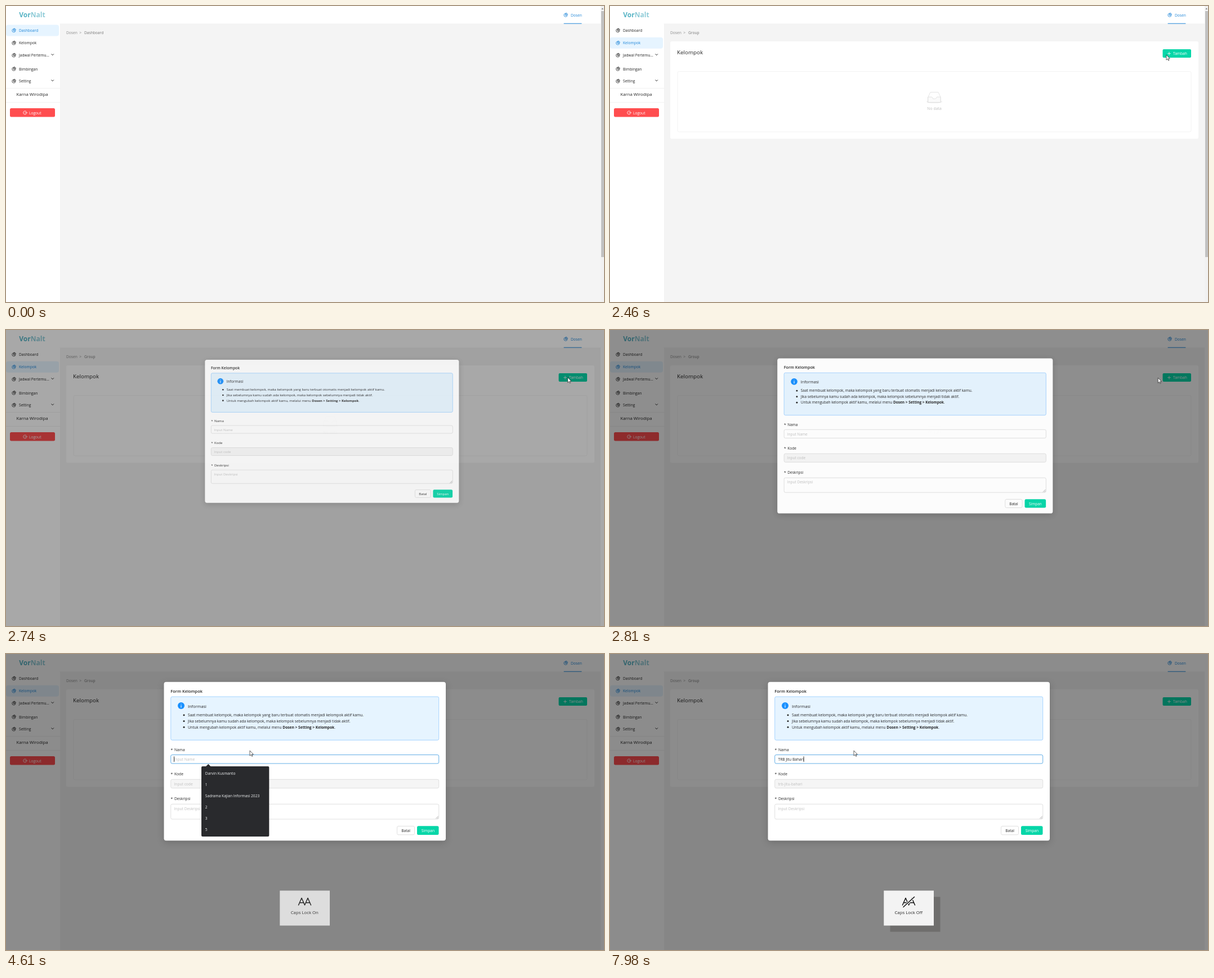
Animation, 1062 px wide and 527 px high, one loop 8 s. Source, as an HTML page:

```html
<!DOCTYPE html>
<html lang="id">
<head>
<meta charset="utf-8">
<title>Form Kelompok</title>
<style>
  html, body { margin: 0; width: 100%; height: 100%; overflow: hidden; background: #fff; }
  svg { display: block; width: 1062px; height: 527px; }
  text { font: 6.65px "Open Sans", "Noto Sans", sans-serif; fill: #262626; white-space: pre; }
  .hint { fill: #bfbfbf; }
  .mid { text-anchor: middle; }
  .line { fill: none; stroke-linecap: round; stroke-linejoin: round; }
</style>
</head>
<body>
<svg id="stage" viewBox="0 0 1062 527"></svg>
<script>
const LOOP = 8000;
const BLUE = '#1f86d8', GREEN = '#06d6a8', DARK = '#262626';

// Markup helpers
const rect = (x, y, w, h, fill, extra = '') =>
  `<rect x="${x}" y="${y}" width="${w}" height="${h}" fill="${fill}" ${extra}/>`;
const text = (x, y, str, style = '', attrs = '') =>
  `<text x="${x}" y="${y}" style="${style}" ${attrs}>${str}</text>`;
const path = (d, stroke, width = 0.8, extra = '') =>
  `<path class="line" d="${d}" stroke="${stroke}" stroke-width="${width}" ${extra}/>`;
const group = (id, body, extra = '') => `<g id="${id}" ${extra}>${body}</g>`;
const pie = (x, y) => path(
  'M-.6-2.9A3.1 3.1 0 1 0 2.9.8H-.6ZM.8-3.4V-.6H3.5A3 3 0 0 0 .8-3.4Z',
  'currentColor', 0.8, `transform="translate(${x} ${y})"`);
const boxed = (x, y, w, h, fill, stroke, extra = '') =>
  rect(x, y, w, h, fill, `rx="2.5" stroke="${stroke}" stroke-width=".8" ${extra}`);

function menuItem(id, y, label, arrow) {
  return `<g id="${id}" color="${DARK}">` +
    rect(0, y - 10, 94, 20, '#e6f4ff', 'rx="4" class="back" opacity="0"') + pie(14, y) +
    text(23, y + 2.5, label, 'fill:currentColor') +
    (arrow ? path(`M80.8 ${y - 2}l1.9 2 1.9-2`, 'currentColor', 1) : '') + '</g>';
}

const sidebar = rect(0, 0, 96.5, 527, '#fff') +
  path('M96.5 32V527', '#ececec', 0.6) +
  menuItem('dash', 43.5, 'Dashboard') +
  menuItem('kel', 65.8, 'Kelompok') +
  menuItem('jadwal', 87.7, 'Jadwal Pertemu...', true) +
  menuItem('bimbing', 112, 'Bimbingan') +
  menuItem('setting', 133.8, 'Setting', true) +
  path('M0 146.5H96M0 171.5H96', '#eee', 0.8) +
  text(46.5, 159.7, 'Karna Wirodipa', 'font-size:7.8px;font-weight:500', 'class="mid"') +
  rect(7, 182, 80, 15.5, '#ff4d4f', 'rx="2.5"') +
  path('M35.8 187.6A3.1 3.1 0 1 0 35.8 192.4M33.8 190H37.3M36.2 188.8L37.4 190 36.2 191.2', '#fff', 0.8) +
  text(41, 192.5, 'Logout', 'fill:#fff;font-weight:500');

const header = rect(0, 0, 1056, 31.5, '#fff') +
  path('M96 31.8H1056', '#ececec', 0.6) +
  `<text x="23.3" y="20.3" style="font-size:12px;font-weight:700;fill:#56b3c4">Vor<tspan fill="#8ecbd7">Nalt</tspan></text>` +
  `<g color="${BLUE}">${pie(994, 16)}</g>` +
  text(1003, 18.5, 'Dosen', `fill:${BLUE}`) +
  path('M991 31.2H1022', BLUE, 1);

const emptyIcon =
  '<ellipse cx="576" cy="170.3" rx="14.5" ry="3" fill="#f3f3f3"/>' +
  path('M565 162L569 153.5H583L587 162V171.5H565Z', '#d9d9d9', 0.7, 'style="fill:#fff"') +
  path('M565 162H571Q572.5 162 573 164T575 165.2H577.5Q579 165.2 579.5 163.6T581 162H587V171.5H565Z', '#d9d9d9', 0.7, 'style="fill:#fafafa"');

const card = rect(107, 63, 938, 173.5, '#fff', 'rx="3"') +
  text(119, 86, 'Kelompok', 'font-size:9.8px;font-weight:500') +
  rect(981.5, 77, 50.5, 15, GREEN, 'id="add" rx="2"') +
  group('addLabel', path('M990.5 84.7H995.5M993 82.2V87.2', '#fff', 0.8) +
    text(1000, 87.3, 'Tambah', 'fill:#fff')) +
  boxed(120, 116.5, 912, 107.5, 'none', '#f0f0f0') + emptyIcon +
  text(576, 185.3, 'No data', 'font-size:6.9px', 'class="mid hint"');

const scrollbar = rect(1056, 0, 6, 527, '#f1f1f1') + rect(1057, 9, 5, 438, '#c1c1c1') +
  '<path d="M1057.5 6L1059.3 3.5 1061 6Z" fill="#777"/>';

const bullet = (y, str) => `<circle cx="316" cy="${y - 2.3}" r="1.5" fill="${DARK}"/>` + text(323, y, str);
const label = (y, str) => text(292.5, y, '*') + text(299, y, str);

const modal = rect(280.5, 49.7, 500.5, 282.5, '#fff', 'rx="4" style="filter:drop-shadow(0 3px 6px rgba(0,0,0,.18))"') +
  text(292.3, 68.6, 'Form Kelompok', 'font-size:7.4px;font-weight:600') +
  boxed(292.7, 76, 476, 77.3, '#e6f4ff', '#91caff') +
  '<circle cx="311" cy="92" r="6" fill="#1890ff"/>' +
  path('M311 91.5V95M311 89.1V89.2', '#fff', 1.1) +
  text(323, 95.6, 'Informasi', 'font-size:7.4px') +
  bullet(111, 'Saat membuat kelompok, maka kelompok yang baru terbuat otomatis menjadi kelompok aktif kamu.') +
  bullet(121.8, 'Jika sebelumnya kamu sudah ada kelompok, maka kelompok sebelumnya menjadi tidak aktif.') +
  bullet(132.6, 'Untuk mengubah kelompok aktif kamu, melalui menu <tspan font-weight="700">Dosen &gt; Setting &gt; Kelompok</tspan>.') +
  label(172.6, 'Nama') + boxed(292.7, 179.5, 476, 15.5, '#fff', '#d9d9d9', 'id="field"') +
  text(298.5, 190, '', '', 'id="name"') +
  rect(298, 182.3, 0.8, 9.8, '#000', 'id="caret"') +
  label(216.4, 'Kode') + boxed(292.7, 223.3, 476, 15.5, '#f5f5f5', '#d9d9d9') +
  text(298.5, 233.5, '', '', 'id="code" class="hint"') +
  label(260.4, 'Deskripsi') + boxed(292.7, 267.3, 476, 26.7, '#fff', '#d9d9d9') +
  text(298.5, 277.7, 'Input Deskripsi', '', 'class="hint"') +
  path('M763.5 293L767.5 289M766 293L767.5 291.5', '#777', 0.6) +
  boxed(694.5, 306.5, 31, 15.3, '#fff', '#d9d9d9') + text(710, 316.9, 'Batal', '', 'class="mid"') +
  rect(730, 306.3, 38.5, 15.7, GREEN, 'rx="2.5"') +
  text(749.3, 316.9, 'Simpan', 'fill:#fff;font-weight:500', 'class="mid"');

const suggestions = ['Darvin Kusmanto', '1', 'Sadrama Kajian Informasi 2023', '2', '3', '5'];
const dropdown = '<path d="M354 201L359.3 196 364.5 201Z" fill="#292a2d"/>' +
  rect(347, 200, 120.3, 125, '#292a2d', 'rx="2"') +
  suggestions.map((s, i) => text(353.8, 215.2 + i * 20.05, s, 'fill:#f1f3f4;font-weight:500')).join('');

const letters = 'M519.5 447L525 434.5 530.5 447M521.5 442.8H528.5M530.5 447L536 434.5 541.5 447M532.5 442.8H539.5';
const caps = rect(497.5, 432.5, 89, 62, '#6f6e6d', 'id="capsShadow"') +
  rect(486.3, 421.3, 88.7, 62.2, '#f3f3f3') + path(letters, '#111', 1.5) +
  group('slash', path('M521 451L541 432', '#f3f3f3', 4) + path('M521 450.5L540.5 432.5', '#111', 1.6)) +
  text(530.3, 462.5, '', 'font-size:7.8px', 'id="capsText" class="mid"');

const arrow = '<path d="M0 0V9.2L2.2 7.2 3.7 10.3 5 9.7 3.6 6.7H6.4Z" fill="#fff" stroke="#222" stroke-width=".7"/>';
const hand = '<path d="M-.9.8Q0-.6.9.8V4.2L4.4 5.2Q5.3 5.6 5.1 6.8L4.3 11.3H-.9L-3.6 7.4Q-3.6 6-2.4 6.4L-.9 7.6Z" fill="#fff" stroke="#222" stroke-width=".8"/>';

const stage = document.getElementById('stage');
stage.innerHTML = rect(0, 0, 1062, 527, '#fff') + rect(96.5, 31.5, 959.5, 496, '#f4f4f4') +
  sidebar + header + text(107, 50.1, 'Dosen  &gt;', 'fill:#8c8c8c') +
  text(139, 50.1, '', 'fill:#777', 'id="crumb"') +
  group('card', card) + group('scroll', scrollbar) +
  group('loading', rect(0, 0, 0, 1.4, '#2299dd', 'id="bar"') +
    path('M1038.6 11.9A4.4 4.4 0 0 1 1047.4 11.9', '#2299dd', 1, 'id="spinner"')) +
  rect(0, 0, 1062, 527, '#000', 'id="mask"') +
  group('modal', modal) + group('dropdown', dropdown) + group('caps', caps) +
  group('cursor', group('arrow', arrow) + group('hand', hand));

const el = {};
stage.querySelectorAll('[id]').forEach(node => el[node.id] = node);
const set = (id, attrs) => { for (const k in attrs) el[id].setAttribute(k, attrs[k]); };
const show = (id, on) => el[id].setAttribute('visibility', on ? 'visible' : 'hidden');

// Linear interpolation over [time, ...values] keys
function track(keys, t) {
  if (t <= keys[0][0]) return keys[0].slice(1);
  for (let i = 1; i < keys.length; i++) {
    const [a, b] = [keys[i - 1], keys[i]];
    if (t < b[0]) return a.slice(1).map((v, k) => v + (b[k + 1] - v) * (t - a[0]) / (b[0] - a[0]));
  }
  return keys[keys.length - 1].slice(1);
}
const latest = (steps, t) => steps.reduce((value, [at, next]) => t >= at ? next : value, '');

const pointer = [
  [130, 914, 493], [270, 640, 330], [410, 310, 185], [550, 90, 90], [690, 33, 66], [960, 34, 65.5],
  [1910, 34, 65.5], [2050, 180, 90], [2260, 700, 100], [2400, 960, 90], [2520, 1015, 84],
  [2690, 1015, 84], [2810, 974, 85], [3100, 740, 125], [3400, 500, 170], [3590, 440, 184],
  [3870, 436, 184], [4200, 433, 174], [4400, 433, 172]
];
// scale, opacity, mask
const opening = [
  [2600, 0.2, 0, 0], [2670, 0.7, 0.68, 0.15], [2740, 0.9, 0.88, 0.34],
  [2810, 0.977, 0.975, 0.445], [2880, 1, 1, 0.45]
];
const progress = [[1160, 0.06], [1360, 0.208], [1560, 0.4], [1700, 1]];
const typing = [
  [4810, 'T'], [5070, 'TR'], [5620, 'TRB'], [5820, 'TRB '], [5960, 'TRB J'], [6030, 'TRB JJ'],
  [6230, 'TRB JJi'], [6630, 'TRB JJ'], [6700, 'TRB J'], [6900, 'TRB Ji'], [7030, 'TRB Jit'],
  [7160, 'TRB Jitu'], [7370, 'TRB Jitu '], [7510, 'TRB Jitu B'], [7650, 'TRB Jitu Ba'],
  [7720, 'TRB Jitu Bah'], [7790, 'TRB Jitu Baha'], [7880, 'TRB Jitu Bahar'], [7960, 'TRB Jitu Bahari']
];
const capsState = [[4470, 'On'], [6130, 'Off'], [7440, 'On'], [7580, 'Off']];

function highlight(id, amount, active) {
  el[id].setAttribute('color', active ? BLUE : DARK);
  el[id].querySelector('.back').setAttribute('opacity', amount);
}

function drawPage(t) {
  const loaded = t >= 1230;
  highlight('dash', track([[1160, 1], [1360, 0.6], [1500, 0]], t)[0], t < 1230);
  highlight('kel', track([[550, 0], [690, 0.7], [1160, 0.7], [1360, 1]], t)[0], t >= 1430);
  el.crumb.textContent = loaded ? 'Group' : 'Dashboard';
  show('card', loaded);
  show('scroll', t < 2600);
  show('loading', t >= 1160 && t < 1910);
  set('loading', { opacity: track([[1740, 1], [1910, 0]], t)[0] });
  set('bar', { width: 1062 * track(progress, t)[0] });
  set('spinner', { transform: `rotate(${(t - 1360) * 0.9 + 30} 1043 11.9)` });
  const pressed = t >= 2600 && t < 2740;
  set('add', { stroke: pressed ? '#058d72' : 'none' });
  set('addLabel', { opacity: pressed ? 0.1 : 1 });
}

function drawForm(t) {
  const [scale, opacity, mask] = track(opening, t);
  set('mask', { opacity: mask });
  show('modal', t >= 2600);
  set('modal', { opacity, transform: `translate(1017 84) scale(${scale}) translate(-1017 -84)` });
  const focused = t >= 3800;
  set('field', { stroke: focused ? '#3c9ae0' : '#d9d9d9' });
  const typed = latest(typing, t);
  el.name.textContent = typed || 'Input Name';
  el.name.setAttribute('class', typed ? '' : 'hint');
  el.code.textContent = typed ? typed.trim().toLowerCase().replace(/ /g, '-') : 'Input code';
  set('caret', { x: 298.1 + (typed ? el.name.getComputedTextLength() : 0) });
  el.caret.style.display = focused ? '' : 'none';
  show('dropdown', t >= 3870 && t < 4810);
}

function drawCaps(t) {
  const state = latest(capsState, t);
  show('caps', state);
  set('caps', { opacity: track([[4460, 0.3], [4610, 0.8], [4680, 1]], t)[0] });
  el.capsShadow.style.display = t >= 4680 ? '' : 'none';
  el.slash.style.display = state === 'Off' ? '' : 'none';
  el.capsText.textContent = 'Caps Lock ' + state;
}

function drawPointer(t) {
  const [x, y] = track(pointer, t);
  const overMenu = t >= 960 && t < 1980;
  set('cursor', { transform: `translate(${x} ${y})` });
  el.cursor.style.display = t >= 130 ? '' : 'none';
  el.arrow.style.display = overMenu ? 'none' : '';
  el.hand.style.display = overMenu ? '' : 'none';
}

function draw(t) {
  drawPage(t);
  drawForm(t);
  drawCaps(t);
  drawPointer(t);
}

const start = performance.now();
function tick() {
  draw((performance.now() - start) % LOOP);
  requestAnimationFrame(tick);
}
tick();
</script>
</body>
</html>
```
